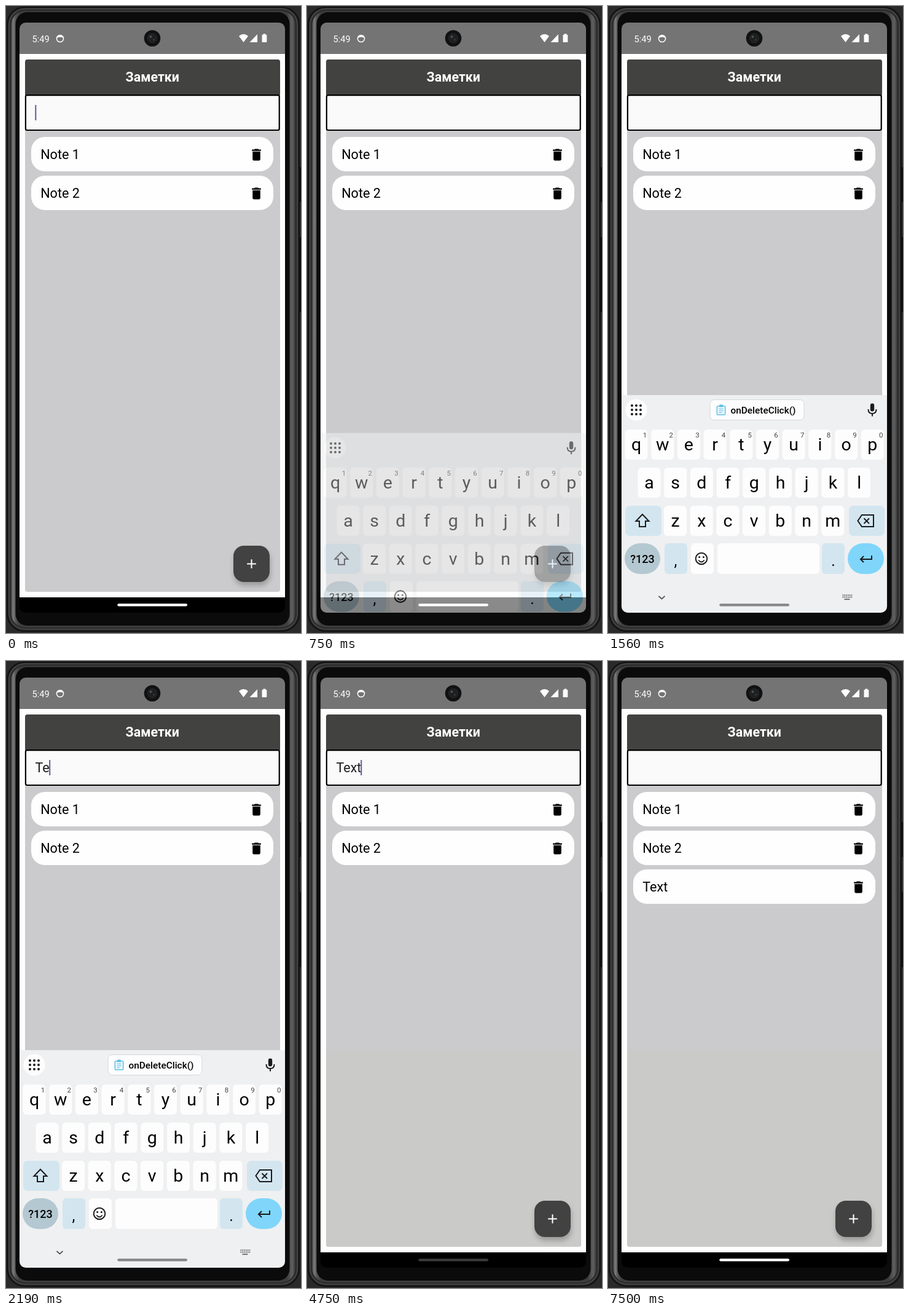
Animation, 480 px wide and 1020 px high, one loop 8 s. Source, as an HTML page:

```html
<!DOCTYPE html>
<html lang="ru">
<head>
<meta charset="utf-8">
<title>Заметки</title>
<style>
html, body { margin: 0; width: 100%; height: 100%; overflow: hidden; background: #2a2a2a; }
svg { display: block; width: 480px; height: 1020px; }
text { font-family: Roboto, "Noto Sans", sans-serif; }
</style>
</head>
<body>
<svg id="stage" viewBox="0 0 480 1020" width="480" height="1020"></svg>
<script>
const LOOP = 8000;

const rect = (x, y, w, h, r, fill, more = "") =>
  `<rect x="${x}" y="${y}" width="${w}" height="${h}" rx="${r}" fill="${fill}" ${more}/>`;
const text = (x, y, size, str, more = "") =>
  `<text x="${x}" y="${y}" font-size="${size}" ${more}>${str}</text>`;
const path = (d, more = "") => `<path d="${d}" ${more}/>`;
const line = (d, color, width, more = "") =>
  path(d, `fill="none" stroke="${color}" stroke-width="${width}" ${more}`);
const circle = (x, y, r, fill, more = "") =>
  `<circle cx="${x}" cy="${y}" r="${r}" fill="${fill}" ${more}/>`;
const MID = 'text-anchor="middle"';

function phone() {
  return rect(0, 0, 480, 1020, 0, "#2a2a2a")
    + rect(476, 262, 4, 57, 1, "#0c0c0c") + rect(476, 376, 4, 122, 1, "#0c0c0c")
    + rect(2, 2, 475, 1015, 28, "#262626", 'stroke="#121212" stroke-width="2"')
    + rect(5, 4.5, 469, 1009.5, 26, "#2c2c2c", 'stroke="#4a4a4a" stroke-width="1.500"')
    + rect(8.5, 8, 462, 1003, 23, "url(#metal)")
    + rect(15.5, 10, 446, 998, 19, "#0b0b0b");
}

function statusBar() {
  return rect(22, 27, 432, 51, 0, "#747474")
    + text(42.5, 58.5, 14.7, "5:49", 'fill="#fff"')
    + circle(88, 53, 5.6, "none", 'stroke="#fff" stroke-width="1.5"')
    + path("M82.6 52Q84 47 88 47T93.4 52Q91 50.5 88 50.5T82.6 52Z", 'fill="#fff"')
    + path("M379 49Q386.5 42.500 394 49L386.500 59Z", 'fill="#fff"')
    + path("M396.500 59H409V46Z", 'fill="#fff"')
    + path("M416.500 47.500Q416.500 46.700 417.300 46.700H418.500V45.300H422.300V46.700H423.500Q424.300 46.700 424.300 47.500V58.200Q424.300 59 423.500 59H417.300Q416.500 59 416.500 58.200Z", 'fill="#fff"')
    + circle(238, 52.5, 13.3, "#111")
    + circle(238, 52.5, 7.5, "#1d1f20", 'stroke="#292b2c"')
    + circle(235.5, 50, 2, "#4b4f50") + circle(240.5, 55, 1.4, "#3a3d3e");
}

function note(y, str) {
  const bin = "M6 19c0 1.100.9 2 2 2h8c1.100 0 2-.9 2-2V7H6v12zM19 4h-3.500l-1-1h-5l-1 1H5v2h14V4z";
  return rect(41, y, 394, 56, 22, "#fefefe")
    + text(56.2, y + 36, 21.6, str)
    + path(bin, `transform="translate(394.900 ${y + 16.4}) scale(1.050)"`);
}

function app() {
  return rect(22, 78, 432, 884, 0, "#fefefe")
    + rect(22, 962, 432, 25, 0, "#000")
    + rect(31, 87, 415, 866, 4, "#cbcbcd")
    + '<path id="lower" d="M31 633H446V949Q446 953 442 953H35Q31 953 31 949Z" fill="#cacac8"/>'
    + rect(31, 87, 415, 60, 4, "#424241")
    + text(238.3, 122.5, 21.4, "Заметки", `${MID} font-weight="700" fill="#fff"`)
    + rect(31.9, 145.1, 412.8, 56.9, 2.5, "#fafafa", 'stroke="#000" stroke-width="2.200"')
    + '<text id="field" x="47.500" y="181" font-size="21.500" fill="#1c1b1f"></text>'
    + '<rect id="caret" y="161" width="2" height="25" fill="#65559c"/>'
    + note(213, "Note 1") + note(276, "Note 2")
    + `<g id="added">${note(339, "Text")}</g>`
    + rect(370, 878, 59, 59, 17, "#424242", 'filter="url(#shade)"')
    + '<g clip-path="url(#fabClip)"><circle id="ripple" cx="399.500" cy="907.500" fill="#fff"/></g>'
    + line("M392.200 907.500H406.800M399.500 900.200V914.800", "#fff", 2);
}

function letterRow(chars, x0, y, hints) {
  return [...chars].map((c, i) => {
    const x = x0 + i * 42.7;
    return rect(x - 18.5, y, 37, 49, 6, "#fdfdfd")
      + text(x, y + 34, 28.5, c, MID)
      + (hints ? text(x + 14, y + 13, 11.5, (i + 1) % 10, `${MID} fill="#444"`) : "");
  }).join("");
}

function chip() {
  return rect(166, 640.5, 153, 33, 7, "#fdfdfe", 'stroke="#d6d7da"')
    + rect(177.3, 651, 13.4, 14, 1.5, "#e8f7fd", 'stroke="#62bfe6" stroke-width="1.500"')
    + rect(181, 648.5, 6, 4, 1, "#62bfe6")
    + line("M180.500 655.500H187.500M180.500 658.500H187.500M180.500 661.500H185", "#62bfe6", 1.2)
    + text(252.5, 663, 15.4, "onDeleteClick()", `${MID} font-weight="500"`);
}

function keyboard() {
  const ink = "#1b1c1e", tint = "#d3e6f0";
  let s = rect(22, 633, 432, 355, 0, "#eff0f1") + circle(46, 657, 17.5, "#fdfdfd");
  for (let i = 0; i < 9; i++) s += circle(39 + (i % 3) * 7, 650 + Math.floor(i / 3) * 7, 2, ink);
  s += rect(426.8, 646.5, 6.4, 13, 3.2, ink)
    + line("M423.500 656Q423.500 663 430 663T436.500 656M430 663V667.500", ink, 2);
  s += letterRow("qwertyuiop", 46, 689, true)
    + letterRow("asdfghjkl", 67, 751)
    + letterRow("zxcvbnm", 109.5, 813);
  // modifier keys
  s += rect(28, 813, 59, 49, 7, tint) + rect(392, 813, 58, 49, 7, tint)
    + line("M56 827L45.500 838H51V847H61V838H66.500Z", ink, 2)
    + line("M413 828H432V847H413L406.500 837.500ZM416.500 833.500L425 842M425 833.500L416.500 842", ink, 2);
  // bottom row
  s += rect(27, 874, 58, 50, 25, "#b4c8d2") + rect(92, 874, 37, 50, 6, tint)
    + rect(135, 874, 37, 50, 6, "#fdfdfd") + rect(178, 874, 166, 50, 6, "#fdfdfd")
    + rect(348, 874, 37, 50, 6, tint) + rect(390, 874, 59, 50, 25, "#7fd6fa")
    + text(56, 906, 18, "?123", `${MID} font-weight="500"`)
    + text(110, 911, 25, ",", MID) + text(366.5, 911, 25, ".", MID)
    + circle(152, 899, 9.3, "none", `stroke="${ink}" stroke-width="2"`)
    + circle(148.6, 896.5, 1.5, ink) + circle(155.4, 896.5, 1.5, ink)
    + line("M147.300 901.500Q152 907.500 156.700 901.500", ink, 1.8)
    + line("M429 894V900H411M416 895L411 900L416 905", ink, 2);
  s += line("M82.500 960L87.500 964.500L92.500 960", "#55585b", 1.7);
  for (let i = 0; i < 12; i++)
    s += rect(381.5 + (i % 6) * 2.8, 957.5 + Math.floor(i / 6) * 3.2, 1.8, 1.9, 0, "#66696c");
  s += rect(384.5, 964.3, 9, 1.8, 0, "#66696c");
  return s + `<g id="chip">${chip()}</g>`;
}

const stage = document.getElementById("stage");
stage.innerHTML = `<defs>
  <linearGradient id="metal"><stop offset="0" stop-color="#4c4c4c"/><stop offset=".007" stop-color="#7c7c7c"/>
    <stop offset=".015" stop-color="#565656"/><stop offset=".03" stop-color="#3c3c3c"/>
    <stop offset=".97" stop-color="#3c3c3c"/><stop offset=".99" stop-color="#606060"/>
    <stop offset="1" stop-color="#3a3a3a"/></linearGradient>
  <filter id="shade" x="-30%" y="-30%" width="160%" height="170%">
    <feDropShadow dx="1" dy="6" stdDeviation="4" flood-opacity=".24"/></filter>
  <clipPath id="screen">${rect(22, 27, 432, 960, 10, "#000")}</clipPath>
  <clipPath id="fabClip">${rect(370, 878, 59, 59, 17, "#000")}</clipPath>
</defs>
${phone()}
<g clip-path="url(#screen)">${statusBar()}${app()}<g id="keys">${keyboard()}</g>
<rect id="pill" x="181.300" y="972.200" width="113.700" height="4.200" rx="2.100"/></g>`;

const el = {};
for (const id of ["lower", "field", "caret", "added", "ripple", "keys", "chip", "pill"])
  el[id] = document.getElementById(id);

const ramp = (t, a, b) => Math.min(1, Math.max(0, (t - a) / (b - a)));
const within = (t, a, b) => t >= a && t < b;
const show = (node, on) => node.setAttribute("display", on ? "inline" : "none");
const set = (node, attrs) => {
  for (const k in attrs) node.setAttribute(k, attrs[k]);
};

// cubic-bezier(.4, 0, .2, 1)
function ease(x) {
  let lo = 0, hi = 1;
  for (let i = 0; i < 24; i++) {
    const m = (lo + hi) / 2, n = 1 - m;
    if (1.2 * n * n * m + 0.6 * n * m * m + m * m * m < x) lo = m; else hi = m;
  }
  return 3 * (1 - lo) * lo * lo + lo * lo * lo;
}

function typed(t) {
  if (t < 1810 || t >= 5620) return "";
  return t < 2130 ? "T" : t < 4750 ? "Te" : "Text";
}

const CARET_X = { "": 47.3, T: 59, Te: 70.2, Text: 87.3 };
const caretOff = [[500, 820], [1310, 1810], [5250, 5620], [6060, LOOP]];

function pillGray(t) {
  if (t < 4750) return 255 - 120 * ramp(t, 940, 1220);
  return 58 + 197 * ramp(t, 4750, 5060);
}

function draw(t) {
  const str = typed(t);
  el.field.textContent = str;
  el.caret.setAttribute("x", CARET_X[str]);
  show(el.caret, !caretOff.some(([a, b]) => within(t, a, b)));
  show(el.added, t >= 5620);
  show(el.lower, t >= 4750);

  const rise = ramp(t, 597, 880);
  show(el.keys, within(t, 597, 4750));
  set(el.keys, { transform: `translate(0 ${354 * (1 - ease(rise))})`, opacity: rise });

  const p = ramp(t, 840, 1040), k = 0.45 + 0.55 * p;
  show(el.chip, t >= 840);
  set(el.chip, {
    transform: `translate(242.500 657) scale(${k}) translate(-242.500 -657)`,
    opacity: 0.4 + 0.6 * p
  });

  const g = Math.round(pillGray(t));
  el.pill.setAttribute("fill", `rgb(${g},${g},${g})`);

  set(el.ripple, {
    r: 12 + 32 * ease(ramp(t, 5500, 5730)),
    opacity: 0.12 * ramp(t, 5500, 5560) * (1 - ramp(t, 5750, 6060))
  });
}

function tick() {
  draw(performance.now() % LOOP);
  requestAnimationFrame(tick);
}
tick();
</script>
</body>
</html>
```
